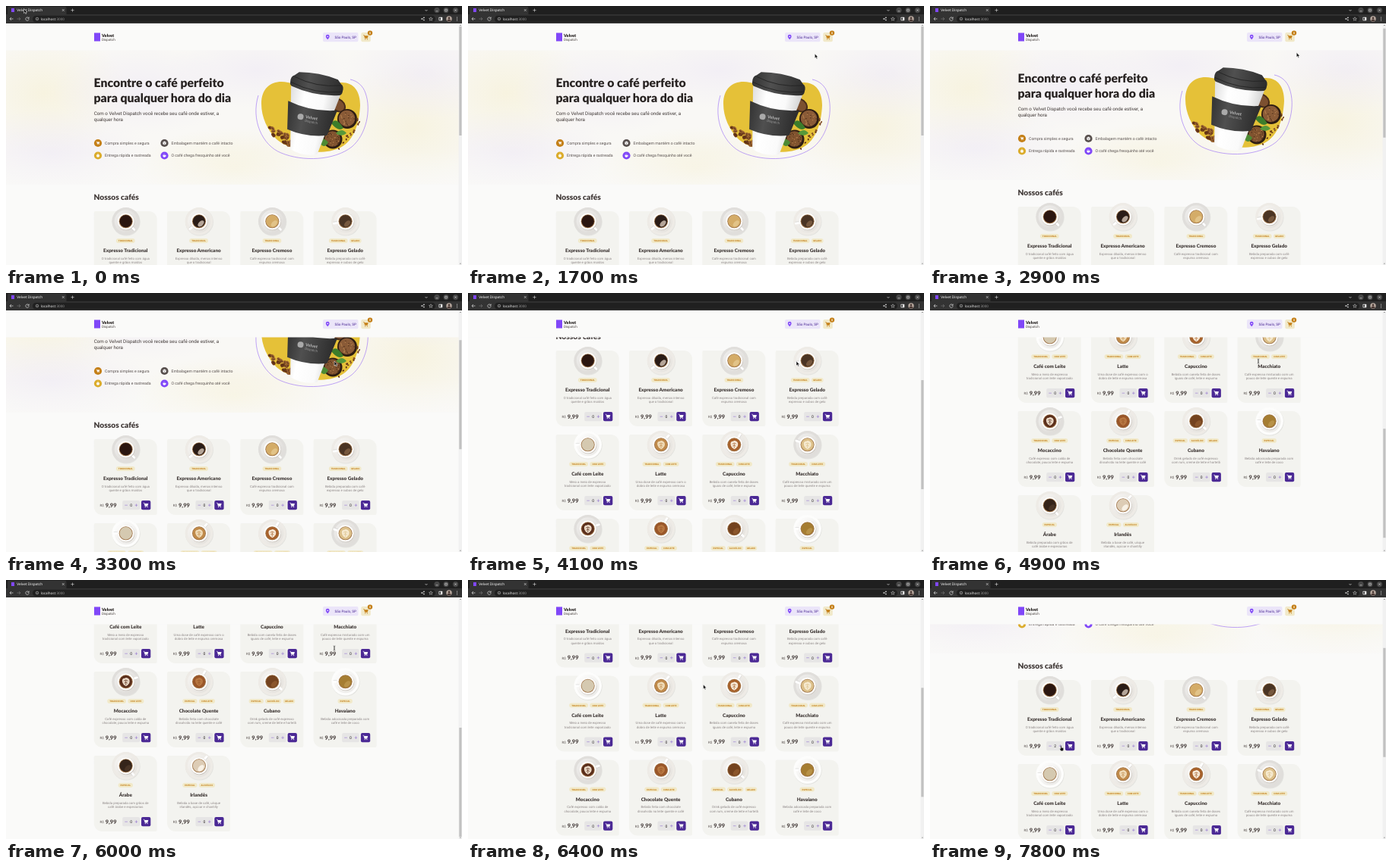
An HTML page for the animation above (8 s loop, 600 px wide and 342 px high).

```html
<!DOCTYPE html>
<html lang="pt-BR">
<head>
<meta charset="utf-8">
<title>Velvet Dispatch</title>
<style>
  html, body { margin: 0; width: 100%; height: 100%; overflow: hidden; background: #fafaf9; }
  svg { display: block; width: 100vw; height: 100vh; }
  text { font-family: Roboto, sans-serif; text-rendering: geometricPrecision; white-space: pre; }
  .title { font-family: Lato, sans-serif; font-weight: 900; }
  .tab { font-family: "Noto Sans", sans-serif; }
</style>
</head>
<body>
<svg id="stage" viewBox="0 0 600 342" preserveAspectRatio="none">
  <defs>
    <radialGradient id="yellow"><stop stop-color="#f5eecb" stop-opacity=".5"/><stop offset="1" stop-color="#f5eecb" stop-opacity="0"/></radialGradient>
    <radialGradient id="violet"><stop stop-color="#ece6f5" stop-opacity=".5"/><stop offset="1" stop-color="#ece6f5" stop-opacity="0"/></radialGradient>
    <linearGradient id="fade" x2="0" y2="1"><stop offset=".75" stop-color="#fafaf9" stop-opacity="0"/><stop offset="1" stop-color="#fafaf9" stop-opacity=".5"/></linearGradient>
    <linearGradient id="paper"><stop stop-color="#dedede"/><stop offset=".3" stop-color="#fff"/><stop offset=".7" stop-color="#fafafa"/><stop offset="1" stop-color="#d2d2d2"/></linearGradient>
    <linearGradient id="dark"><stop stop-color="#333"/><stop offset=".35" stop-color="#505050"/><stop offset="1" stop-color="#2b2b2b"/></linearGradient>
    <linearGradient id="china" x2="1" y2="1"><stop stop-color="#fff"/><stop offset="1" stop-color="#d8d5d0"/></linearGradient>
    <clipPath id="heroBox"><path d="M0 58H596V235.500H0z"/></clipPath>
  </defs>
  <g id="page"></g>
  <g id="header"></g>
  <g id="browser"></g>
  <rect id="thumb" x="596.300" width="3.200" height="144" fill="#c1c1c1"/>
  <g id="cursor">
    <path id="arrow" d="M0 0V6L1.400 4.800 2.400 7 3.400 6.500 2.500 4.500H4.300z" fill="#111" stroke="#fff" stroke-width=".5"/>
    <path id="beam" d="M-1.300-3Q0-3 0-2.200V2.200Q0 3-1.300 3M1.300-3Q0-3 0-2.200V2.200Q0 3 1.300 3" fill="none" stroke="#333" stroke-width=".6"/>
    <path id="hand" d="M-.6 0Q0-.6.6 0V2.400L3.200 3V5.500L2.500 7H-.4L-1.800 4.300-1.500 3.500-.6 4z" fill="#111" stroke="#fff" stroke-width=".4"/>
  </g>
</svg>
<script>
const $ = id => document.getElementById(id);
const PURPLE = '#8047f8', DEEP = '#4b2995', AMBER = '#c47f17', GOLD = '#dbac2c', CREAM = '#f1e9c9', INK = '#272221';

const text = (x, y, size, fill, str, extra = '') => `<text x="${x}" y="${y}" font-size="${size}" fill="${fill}" ${extra}>${str}</text>`;
const rect = (x, y, w, h, fill, r = 0) => `<rect x="${x}" y="${y}" width="${w}" height="${h}" rx="${r}" fill="${fill}"/>`;
const circle = (x, y, r, fill, extra = '') => `<circle cx="${x}" cy="${y}" r="${r}" fill="${fill}" ${extra}/>`;
const ellipse = (x, y, rx, ry, fill, turn = 0) => `<ellipse rx="${rx}" ry="${ry}" fill="${fill}" transform="translate(${x} ${y}) rotate(${turn})"/>`;
const shape = (d, fill) => `<path d="${d}" fill="${fill}"/>`;
const line = (d, stroke, w = .7) => `<path d="${d}" fill="none" stroke="${stroke}" stroke-width="${w}"/>`;
const at = (x, y, body, scale = 1, turn = 0) => `<g transform="translate(${x} ${y}) rotate(${turn}) scale(${scale})">${body}</g>`;
const MID = 'text-anchor="middle"', TITLE = 'class="title"';

const cart = (x, y, color, scale = 1) => at(x, y,
  line('M-3.300-2.700H-2.200L-1.100 1.400H2.200', color, .7) + shape('M-2-2H3.200L2.300.900H-1.200z', color) +
  circle(-.8, 2.600, .65, color) + circle(1.900, 2.600, .65, color), scale);

let seed = 7;
const random = () => (seed = seed * 16807 % 2147483647) / 2147483647;
const scatter = (n, draw) => Array.from({ length: n }, draw).join('');
const bean = (x, y, r = 3) => {
  const turn = random() * 180;
  return ellipse(x, y, r, r * .7, random() < .5 ? '#6f3c1a' : '#9a6230', turn) + ellipse(x, y, r * .75, .3, '#3b1c0c', turn);
};

function paperCup() {
  return shape('M-33 8H33L18 90Q0 97-18 90z', 'url(#paper)') +
    shape('M-33 28Q0 37 33 28L26 63Q0 71-27 65z', 'url(#dark)') +
    shape('M-35 3Q-36-5-31-7L-26-12Q0-17 26-12L31-7Q36-5 35 3Q35 7 32 8Q0 16-32 8Q-35 7-35 3z', 'url(#dark)') +
    line('M-31-5Q0 4 31-5M-34 3Q0 13 34 3', '#222', .8) +
    circle(-13, 45.500, 4, '#aaa') + text(-6.500, 46, 5.600, '#aaa', 'Velvet', TITLE) + text(-6.500, 51, 4.400, '#999', 'Dispatch');
}

function heroArt() {
  const bowl = (x, y, r, fill) => circle(x, y, r, '#2e1d13') + circle(x - .5, y - .5, r - 2.300, fill) +
    scatter(26, () => {
      const a = random() * 6.283, d = Math.sqrt(random()) * (r - 3.500);
      return circle(x + d * Math.cos(a), y + d * Math.sin(a), .7, random() < .5 ? '#4a2c18' : '#b98350');
    });
  return shape('M336 129C336 106 352 97 371 101C390 107 421 104 440 101C457 100 466 112 466 131C465 153 459 177 440 187C416 199 373 191 356 176C344 164 336 147 336 129z', '#e5c138') +
    line('M332 118C322 150 337 184 362 194C391 206 432 204 455 186C474 170 481 137 473 115C470 106 463 99 453 97', '#9668f5', .6) +
    ellipse(437, 131, 11, 8.500, '#4a2d1a', 40) + ellipse(437, 131, 9, 6.500, '#7c5030', 40) +
    bowl(449, 149, 13, '#8a5b37') + bowl(430, 176, 12.500, '#80532f') +
    shape('M428 155Q434 145 444 161Q438 167 428 155z', '#3c7d2b') + shape('M434 168Q442 160 448 168Q441 174 434 168z', '#57983a') +
    shape('M412 180Q416 171 424 180Q419 190 412 180z', '#4c8a33') +
    scatter(26, () => { const k = random(); return bean(345 + k * 34, 164 + k * 16 + random() * 13 - 6); }) +
    scatter(16, () => { const k = random(); return bean(438 + k * 28, 193 - k * 45 + random() * 12 - 6, 1.400); }) +
    at(409, 104, paperCup(), 1, 11);
}

function hero() {
  const glow = [['yellow', 50, 115, 110, 80], ['violet', 60, 195, 130, 60], ['yellow', 300, 215, 130, 55], ['violet', 330, 85, 120, 50],
    ['yellow', 535, 160, 120, 85], ['violet', 550, 90, 110, 60], ['violet', 180, 110, 120, 60]]
    .map(([id, ...box]) => ellipse(...box, `url(#${id})`)).join('');
  const perks = [[121, 181, AMBER, 'Compra simples e segura'], [208.500, 181, '#574f4d', 'Embalagem mantém o café intacto'],
    [121, 197.500, GOLD, 'Entrega rápida e rastreada'], [208.500, 197.500, PURPLE, 'O café chega fresquinho até você']];
  const icons = [
    cart(0, 0, '#fff', .7),
    shape('M0-2.500L2.200-1.300V1.300L0 2.500-2.200 1.300V-1.300z', '#fff') + line('M-2-1.200L0 0 2-1.200M0 0V2.400', '#574f4d', .4),
    circle(0, .3, 2, '#fff') + line('M0-.9V.4M-.8-2.400H.8', '#fff', .5) + line('M0-.8V.4', GOLD, .4),
    shape('M-2.200-.7H1.700V.6Q1.500 2.200 0 2.200H-.7Q-2.200 2-2.200-.7z', '#fff') + line('M1.600-.2Q2.700-.3 2.400.5T1.500 1M-1.200-1.200V-2.300M.2-1.200V-2.300', '#fff', .4)];
  return `<g clip-path="url(#heroBox)">${rect(0, 58, 596, 178, '#f9f8f5')}${glow}${rect(0, 58, 596, 178, 'url(#fade)')}</g>` +
    text(115.500, 106.700, 15.800, INK, 'Encontre o café perfeito', TITLE) +
    text(115.500, 126.700, 15.800, INK, 'para qualquer hora do dia', TITLE) +
    text(115.700, 143.700, 6.250, '#403937', 'Com o Velvet Dispatch você recebe seu café onde estiver, a') +
    text(115.700, 151.800, 6.250, '#403937', 'qualquer hora') +
    perks.map(([x, y, color, label], i) => circle(x, y, 5.100, color) + at(x, y, icons[i]) +
      text(x + 9, y + 1.800, 5.200, '#574f4d', label)).join('') +
    heroArt() + text(115.500, 255.900, 10.200, '#403937', 'Nossos cafés', TITLE);
}

// name, description lines, tags, coffee, foam (optional), saucer, handle angle
const T = 'TRADICIONAL', M = 'COM LEITE', E = 'ESPECIAL', A = 'ALCOÓLICO', G = 'GELADO';
const WHITE = '#fdfdfc', GREY = '#e0dedb', SHELL = '#eeebe6';
const coffees = [
  ['Expresso Tradicional', 'O tradicional café feito com água', 'quente e grãos moídos', [T], '#2b1610', '', GREY, 45],
  ['Expresso Americano', 'Expresso diluído, menos intenso', 'que o tradicional', [T], '#2a1c17', '#b5a598', SHELL, 140],
  ['Expresso Cremoso', 'Café expresso tradicional com', 'espuma cremosa', [T], '#d4ac68', '#e2c388', GREY, 45],
  ['Expresso Gelado', 'Bebida preparada com café', 'expresso e cubos de gelo', [T, G], '#4a3424', '#77583e', SHELL, 170],
  ['Café com Leite', 'Meio a meio de expresso', 'tradicional com leite vaporizado', [T, M], '#d5c9b0', '', WHITE, 180],
  ['Latte', 'Uma dose de café expresso com o', 'dobro de leite e espuma cremosa', [T, M], '#c08a4a', '#f0dcb8', SHELL, -50],
  ['Capuccino', 'Bebida com canela feita de doses', 'iguais de café, leite e espuma', [T, M], '#a8622c', '#f7ead8', SHELL, -60],
  ['Macchiato', 'Café expresso misturado com um', 'pouco de leite quente e espuma', [T, M], '#dcc08a', '#f6ead0', GREY, 200],
  ['Mocaccino', 'Café expresso com calda de', 'chocolate, pouco leite e espuma', [T, M], '#5b2f1c', '#ead9c6', GREY, -20],
  ['Chocolate Quente', 'Bebida feita com chocolate', 'dissolvido no leite quente e café', [E, M], '#9a5629', '#b87842', SHELL, -60],
  ['Cubano', 'Drink gelado de café expresso', 'com rum, creme de leite e hortelã', [E, A, G], '#74431f', '#8b562b', SHELL, 40],
  ['Havaiano', 'Bebida adocicada preparada com', 'café e leite de coco', [E], '#a57d32', '#b89248', WHITE, 180],
  ['Árabe', 'Bebida preparada com grãos de', 'café árabe e especiarias', [E], '#35241a', '#493426', SHELL, 50],
  ['Irlandês', 'Bebida a base de café, uísque', 'irlandês, açúcar e chantilly', [E, A], '#ddccb5', '#f8f1e6', SHELL, -50],
];

function cup(milky, coffee, foam, saucer, angle) {
  const art = milky
    ? shape('M-4.500 1Q-6-4.500-1.300-4.500Q0-6 2.700-4.500Q6-3 4.500 2Q2.700 5 0 6Q-3.600 4.500-4.500 1z', foam) + line('M-2.700-1Q0-3.600 2.700-1M-2.200 2Q0-1 2.200 2M0 4.500V-2', coffee, .7)
    : ellipse(2.500, 3, 5, 3, foam, -45);
  return circle(.5, .8, 18.500, '#0001') + circle(0, 0, 18.300, saucer) + circle(0, 0, 15, 'url(#china)', 'opacity=".5"') +
    `<g transform="rotate(${angle})">${rect(9, -1.500, 8, 3, '#fff', 1.500)}${line('M11 1.700H16', '#bbb', .4)}</g>` +
    circle(.4, .6, 11.300, '#c8c3bd') + circle(0, 0, 11.100, '#fdfcfa') + circle(0, 0, 9, '#a0764c') + circle(0, 0, 8.200, coffee) + (foam && art);
}

function card([name, line1, line2, tags, ...look], i) {
  const widths = tags.map(tag => 4.800 + tag.length * 1.820);
  let x = 41.600 - (widths.reduce((a, b) => a + b) + 2.200 * (tags.length - 1)) / 2;
  const labels = tags.map((tag, k) => {
    const w = widths[k], left = x;
    x += w + 2.200;
    return rect(left, 36, w, 6.100, CREAM, 3) + text(left + w / 2, 40.100, 2.950, AMBER, tag, MID + ' font-weight="700"');
  }).join('');
  return at(115.700 + i % 4 * 96.300, 271 + Math.floor(i / 4) * 111,
    shape('M2 0H72A11 11 0 0 1 83 11V98A2 2 0 0 1 81 100H11A11 11 0 0 1 0 89V2A2 2 0 0 1 2 0z', '#f3f3ef') +
    at(42, 13.300, cup(tags.includes(M), ...look)) + labels +
    text(41.600, 54.300, 6.350, '#403937', name, MID + ' ' + TITLE) +
    text(41.600, 63.500, 4.300, '#8d8686', line1, MID) + text(41.600, 69.300, 4.300, '#8d8686', line2, MID) +
    text(7.800, 89.200, 4.400, '#574f4d', 'R$') + text(15, 89.700, 7.500, '#574f4d', '9,99', TITLE) +
    rect(37.500, 81, 22.700, 12.200, '#e6e5e5', 2) +
    line('M40.600 87.200H44.200M54 87.200H57.600M55.800 85.400V89', '#9273d0', .6) +
    text(48.900, 89, 5, INK, '0', MID + ` id="count${i}"`) +
    rect(62.300, 81, 12.300, 12.200, DEEP, 2) + cart(68.400, 87, '#fff'));
}

function header() {
  return rect(0, 22, 600, 36.500, '#fafaf9') + rect(116, 35.500, 8, 11, PURPLE) +
    text(126, 40.800, 5.700, INK, 'Velvet', TITLE) + text(126, 46.400, 4.500, '#403937', 'Dispatch') +
    rect(417, 35, 46.500, 12.300, '#ebe5f9', 2) +
    shape('M423.200 44.200Q420.700 41.500 420.800 40.200A2.400 2.400 0 0 1 425.600 40.200Q425.700 41.500 423.200 44.200z', PURPLE) + circle(423.200, 40.300, .9, '#ebe5f9') +
    text(432.500, 42.900, 4.600, DEEP, 'São Paulo, SP') +
    rect(467.300, 35, 12.500, 12.300, CREAM, 2) + cart(473.500, 41.200, AMBER) +
    circle(479, 35.600, 3.200, AMBER) + text(479, 36.900, 3.600, '#fff', '0', MID + ' font-weight="700"');
}

function browser() {
  const icon = '#ddd';
  return rect(0, 0, 600, 23, '#1f1f1f') + shape('M2 11.500V3Q2 .8 4 .8H77.500Q79.500 .8 79.500 3V11.500z', '#333') + rect(0, 11, 600, 12, '#333') +
    rect(35, 12.800, 530, 8.800, '#202020', 4.400) + rect(7, 3, 4, 5, PURPLE) +
    text(14.300, 7.400, 4.700, '#fff', 'Velvet Dispatch', 'class="tab"') +
    line('M73.800 4L76.800 7M76.800 4L73.800 7M87.500 3.500V7.700M85.400 5.600H89.600', icon, .6) +
    line('M9.500 17H5M7 15L5 17 7 19', icon) + line('M14.500 17H19M17 15L19 17 17 19', '#777') +
    line('M29.700 15.700A2.200 2.200 0 1 0 30.200 17.300M30.200 14.500V16.300H28.400', icon) +
    circle(41, 17, 1.800, 'none', `stroke="${icon}" stroke-width=".5"`) + line('M41 16.800V18M41 15.800V16.200', icon, .5) +
    text(45.800, 18.600, 4.600, '#eee', 'localhost<tspan fill="#999">:3000</tspan>', 'class="tab"') +
    line('M551.500 5L553 6.500 554.500 5', icon) + [567, 579, 591.500].map(x => circle(x, 5.600, 3.600, '#484848')).join('') +
    line('M565.600 6.800H568.400M577.700 4.300H580.300V6.900H577.700zM590.300 4.400L592.700 6.800M592.700 4.400L590.300 6.800', '#eee', .6) +
    line('M550 15.500L547 17 550 18.500', icon, .5) + circle(550, 15.400, .8, icon) + circle(547, 17, .8, icon) + circle(550, 18.600, .8, icon) +
    line('M559 14.700L559.700 16.300 561.400 16.400 560.100 17.500 560.500 19.200 559 18.300 557.500 19.200 557.900 17.500 556.600 16.400 558.300 16.300z', icon, .5) +
    rect(569.500, 14.800, 4.800, 4.400, '#eee', .6) + rect(570.200, 15.600, 1.800, 2.800, '#333') +
    circle(583, 17, 3.700, '#b9aaa0') + circle(583, 16, 1.400, '#4a3a35') + shape('M580.300 19.500Q580.500 17.600 583 17.600T585.700 19.500Q583 21.700 580.300 19.500z', '#4a3a35') +
    [15, 17, 19].map(y => circle(593.500, y, .6, icon)).join('') +
    rect(595.600, 23, 4.400, 319, '#f1f1f1') + shape('M596.800 26L597.900 24.700 599 26zM596.800 339.800L597.900 341.100 599 339.800z', '#777');
}

$('page').innerHTML = rect(0, 0, 600, 760, '#fafaf9') + hero() + coffees.map(card).join('');
$('header').innerHTML = header();
$('browser').innerHTML = browser();

const scrollKeys = [[2800, 0], [2900, 6], [3300, 78], [3700, 180], [3800, 182], [4000, 182], [4100, 195], [4500, 265], [4600, 265],
  [4700, 285], [4900, 337], [5100, 348], [5200, 348], [5300, 357], [5500, 372], [6000, 372], [6800, 139]];
const cursorKeys = [[0, 23.500, 3.500], [100, 23.500, 3.500], [300, 2, 6], [500, 8, 6], [600, 8, 6], [1500, 348, 56], [1700, 456.300, 63],
  [2400, 473, 42], [2700, 499, 52], [2800, 499, 52], [3200, 432, 90], [6000, 432, 90], [6800, 187, 186],
  [7100, 173, 219], [7500, 172.500, 218.800]];

function sample(keys, t) {
  const next = keys.findIndex(key => key[0] > t);
  if (next <= 0) return (next ? keys.at(-1) : keys[0]).slice(1);
  const a = keys[next - 1], b = keys[next], k = (t - a[0]) / (b[0] - a[0]);
  return a.slice(1).map((v, i) => v + (b[i + 1] - v) * k);
}

function frame(now) {
  const t = Math.floor(now % 8000 / 100) * 100;
  const [scroll] = sample(scrollKeys, t), [x, y] = sample(cursorKeys, t);
  $('page').setAttribute('transform', `translate(0 ${-scroll})`);
  $('thumb').setAttribute('y', 27 + scroll * 168 / 372);
  $('cursor').setAttribute('transform', `translate(${x} ${y})`);
  const pointer = t >= 100 && t < 300 ? '' : t >= 7300 || t >= 2300 && t < 2500 ? 'hand' : t >= 4700 && t <= 6000 ? 'beam' : 'arrow';
  for (const id of ['arrow', 'beam', 'hand']) $(id).style.display = id === pointer ? '' : 'none';
  $('count0').textContent = t >= 7800 ? 2 : t >= 7700 ? 1 : 0;
  requestAnimationFrame(frame);
}
requestAnimationFrame(frame);
</script>
</body>
</html>
```
